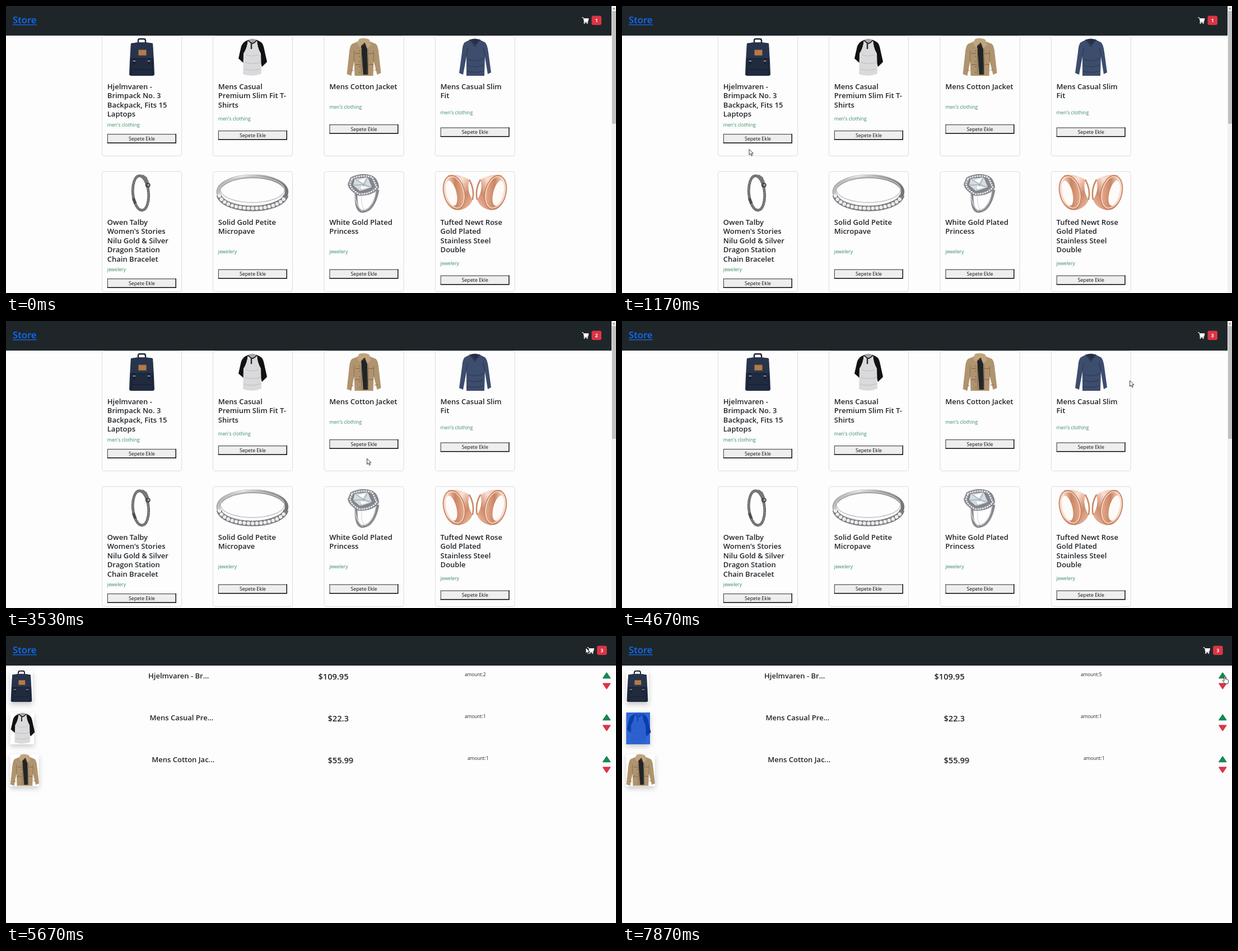
Recreate the animation shown at these times as an HTML page. Size 1089 by 514 pixels, loop 8 s.

```html
<!DOCTYPE html>
<html lang="en">
<head>
<meta charset="utf-8">
<title>Store</title>
<style>
html, body { margin: 0; width: 100%; height: 100%; overflow: hidden; background: #fdfdfd; }
svg { display: block; }
#stage { width: 100%; height: 100%; }
text { font-family: "Open Sans", "Noto Sans", sans-serif; fill: #212529; white-space: pre; }
.brand { font-size: 16.7px; font-weight: 600; fill: #0d6efd; }
.title { font-size: 13px; font-weight: 600; }
.kind { font-size: 8.6px; fill: #3b8a66; }
.label { font-size: 8.8px; fill: #111; text-anchor: middle; }
.price { font-size: 14.6px; font-weight: 600; }
.amount { font-size: 8.3px; }
.badge { font-size: 8.4px; font-weight: 700; fill: #fff; text-anchor: middle; }
.card { fill: #fdfdfd; stroke: #dcdcde; }
.photo { filter: drop-shadow(0 4px 5px rgba(0, 0, 0, .2)); }
</style>
</head>
<body>
<svg id="stage" viewBox="0 0 1089 514" preserveAspectRatio="none">
  <defs>
    <linearGradient id="silver" x2="1" y2=".4">
      <stop offset="0" stop-color="#8c8c8e"/><stop offset=".3" stop-color="#e9e9ea"/>
      <stop offset=".6" stop-color="#a5a5a8"/><stop offset="1" stop-color="#747477"/>
    </linearGradient>
    <linearGradient id="rose" x2="1" y2="1">
      <stop offset="0" stop-color="#e9b49b"/><stop offset=".35" stop-color="#fae0d3"/>
      <stop offset=".65" stop-color="#d08b6a"/><stop offset="1" stop-color="#f0c5b0"/>
    </linearGradient>
    <linearGradient id="roseIn" x2="1" y2=".4">
      <stop offset=".3" stop-color="#f6d8c9"/><stop offset=".65" stop-color="#c98562"/><stop offset="1" stop-color="#e3a88c"/>
    </linearGradient>

    <g id="backpack">
      <path d="M17 10V4q0-3 3-3h7q3 0 3 3v6" fill="none" stroke="#1a2130" stroke-width="2.4"/>
      <path d="M4 9q20-4 39 0l2 31 1 24q0 3-4 3H5q-4 0-4-3l1-24z" fill="#212b40"/>
      <path d="M4 9q20-4 39 0l1 27H3z" fill="#28344c"/>
      <path d="M3 36h41M5 42v23M42 42v23M6 56h35" stroke="#151c2b" fill="none"/>
      <path d="M10 36v11M36 36v11" stroke="#10172a" stroke-width="2"/>
      <path d="M8 40.5h4M34 40.5h4" stroke="#c3c6cb" stroke-width="1.5"/>
      <rect x="17.5" y="20.5" width="14" height="10" fill="#b57a45"/>
    </g>
    <g id="shirt">
      <path d="M18 3Q9 6 6 14L1 36l9 8 6-18zM34 3q10 3 12 12l6 27-9 9-8-25z" fill="#121214"/>
      <path d="M18 3l8 5 8-5q1 14 7 24l1 36q-16 7-33 1l1-37q6-9 8-24z" fill="#dadadc"/>
      <path d="M14 29q10 5 23 0M12 43q14 4 28 0M12 55q12 5 29-1" fill="none" stroke="#bdbdc1"/>
      <path d="M18 3q8-5 16 0l-6 5h-4z" fill="#a6a6aa"/>
      <path d="M18 3q5 6 8 6t8-6" fill="none" stroke="#19191b" stroke-width="1.8"/>
      <path d="M24 8v11" stroke="#2a2a2c" stroke-width="2.4"/>
    </g>
    <g id="jacket">
      <path d="M21 5L9 10Q5 14 4 27L0 64l8 3 5-26 1 26h33l1-26 6 24 7-3-4-35q-1-13-5-17L40 5z" fill="#b0946f"/>
      <path d="M25 7l11 1 2 57h-9z" fill="#35322f"/>
      <path d="M26 14l6-2 4 7-1 45h-4z" fill="#1f2426"/>
      <path d="M22 1q9-3 18 1l3 11-7 5-4-11-9 9-5-7z" fill="#bfa47d"/>
      <path d="M13 22v20M48 22v20M26 17v48M38 19v46M7 57l5 1M49 57l6-1" fill="none" stroke="#866e50"/>
      <path d="M15 27h9M39 27h9M15 47h10M39 47h8" stroke="#8a7151" stroke-width="1.7"/>
      <path d="M23 22v42" stroke="#665239" stroke-width="1.4" stroke-dasharray="1.5 8"/>
    </g>
    <g id="sweater">
      <path d="M20 2L10 7Q6 10 5 25L0 62l7 3 6-32v34h32l1-34 5 31 6-3-5-37Q50 10 46 7L36 2z" fill="#3d4d6d"/>
      <path d="M20 2q8-3 16 0l-7 10z" fill="#252f45"/>
      <path d="M19 2l9 12 9-12" fill="none" stroke="#2d3a54" stroke-width="2"/>
      <path d="M13 31l2-14M46 31l-3-14M15 37q14 7 29-2M14 48q17 6 30-1M14 59q16 4 29-1" fill="none" stroke="#2d3a56" stroke-width="1.3"/>
    </g>
    <g id="bracelet" fill="none" transform="rotate(-5 18 34)">
      <ellipse cx="18" cy="34" rx="14" ry="31" stroke="#58585c" stroke-width="4.6"/>
      <ellipse cx="18" cy="34" rx="14" ry="31" stroke="#b0b0b4" stroke-width="2.6" stroke-dasharray="1.2 1.6"/>
      <path d="M23 3l6 5 3 9" stroke="#77777b" stroke-width="5"/>
      <circle cx="32" cy="21" r="3.4" stroke="#38383c" stroke-width="2"/>
      <path d="M4 42l3 10" stroke="#4e4e52" stroke-width="5"/>
    </g>
    <g id="band" fill="none">
      <ellipse cx="64" cy="32" rx="61" ry="28" stroke="#88888b" stroke-width="6.5"/>
      <ellipse cx="64" cy="31.5" rx="61" ry="28" stroke="url(#silver)" stroke-width="5"/>
      <ellipse cx="64" cy="28" rx="57" ry="23" stroke="#c2c2c5" stroke-width="1.5"/>
      <path d="M4 38C14 70 114 70 124 38" stroke="#7c7c80" stroke-width="9"/>
      <path d="M5 39C15 69 113 69 123 39" stroke="#ececef" stroke-width="6.4" stroke-linecap="round" stroke-dasharray="0 7.4"/>
    </g>
    <g id="princess" fill="none">
      <path d="M16 35Q15 67 28 67Q48 65 55 28" stroke="#88888d" stroke-width="5"/>
      <path d="M13 36Q17 60 28 66M26 38Q24 60 33 65M50 20Q53 50 34 64" stroke="#dedee2" stroke-width="2.2" stroke-dasharray="2 1"/>
      <path d="M6 6Q27-4 45 3Q56 9 57 24Q48 39 21 39Q3 30 1 18Z" fill="#85858d"/>
      <path d="M9 8Q28 0 45 6L53 24Q42 36 22 36Q6 28 5 17Z" stroke="#e6e6ea" stroke-width="3.4" stroke-linecap="round" stroke-dasharray="0 4.3"/>
      <path d="M13 8L37 5L45 24L23 31L10 20Z" fill="#d5dce0" stroke="#73777d"/>
      <path d="M13 8l17 11 7-14M10 20l20-1 15 5M30 19l-7 12" stroke="#8c9aa3"/>
      <path d="M20 11l8 5 5-8zM25 21l12 3-12 3z" fill="#fff"/>
    </g>
    <g id="flare">
      <path d="M12 2Q34-1 50 10Q45 30 56 46Q50 62 30 65Z" fill="url(#rose)"/>
      <path d="M50 10Q60 27 56 46" fill="none" stroke="#c98562" stroke-width="2.5"/>
      <g transform="rotate(-14 23 33)">
        <ellipse cx="23" cy="33" rx="18.5" ry="31" fill="url(#roseIn)" stroke="#c27b58" stroke-width="1.6"/>
        <ellipse cx="24" cy="33" rx="16" ry="28.5" fill="none" stroke="#f8ded1" stroke-width="1.5"/>
        <ellipse cx="18" cy="33" rx="9" ry="23" fill="#fdfaf8"/>
      </g>
    </g>
    <g id="cart" fill="#fff">
      <path d="M0 .7h2.4l.6 2H12l-1.4 5.4H4.1L4.3 9h6.4" fill="none" stroke="#fff" stroke-width="1"/>
      <path d="M2.7 2.3H12l-1.5 5.6H3.8z"/>
      <circle cx="4.6" cy="10.5" r="1.2"/><circle cx="9.6" cy="10.5" r="1.2"/>
    </g>
  </defs>

  <g id="shop"></g>
  <g id="basket"></g>

  <rect width="1089" height="53" fill="#1f262a"/>
  <text class="brand" x="12" y="31">Store</text>
  <path d="M12 33.6h43" stroke="#0d6efd" stroke-width="1.4"/>
  <g id="tools">
    <use href="#cart" x="1028" y="20"/>
    <rect x="1045.5" y="17.5" width="17.5" height="16.5" rx="3.2" fill="#dc3545"/>
    <text class="badge" id="count" x="1054.2" y="28.8">1</text>
  </g>

  <g id="scrollbar">
    <rect x="1081" width="8" height="514" fill="#f1f1f1"/>
    <path d="M1082.8 6l2.4-3 2.4 3z" fill="#8a8a8a"/>
    <rect id="thumb" x="1082" y="9" width="7" height="202"/>
  </g>

  <g id="cursor" stroke="#222" stroke-width=".9" fill="#fff" stroke-linejoin="round">
    <path id="arrow" d="M0 0v10.2l2.4-2.2 1.7 3.8 1.7-.8-1.7-3.6h3.3z"/>
    <path id="hand" d="M-1 1q0-1.5 1.1-1.5T1.2 1v4l1.6.3 1.7.4 1.3.6q.9.4.9 1.6V10q0 1.2-.9 2.5v1H-.4v-1L-3.4 8.6q-.7-1.1.2-1.6.8-.3 1.4.5l.8.9z"/>
  </g>
</svg>

<script>
const el = id => document.getElementById(id);
const LOOP = 8000, PAGE_AT = 5630;

const columns = [171.5, 369.5, 568, 766.3];
// picture, picture x, title lines, category baseline, button top
const products = [
  ["backpack", 219, ["Hjelmvaren -", "Brimpack No. 3", "Backpack, Fits 15", "Laptops"], 216, 229],
  ["shirt", 414, ["Mens Casual", "Premium Slim Fit T-", "Shirts"], 205, 223],
  ["jacket", 608.5, ["Mens Cotton Jacket"], 183.5, 212],
  ["sweater", 809, ["Mens Casual Slim", "Fit"], 194, 217.5],
  ["bracelet", 222.5, ["Owen Talby", "Women's Stories", "Nilu Gold & Silver", "Dragon Station", "Chain Bracelet"], 475.3, 488],
  ["band", 376, ["Solid Gold Petite", "Micropave"], 442.5, 471.5],
  ["princess", 609, ["White Gold Plated", "Princess"], 442.5, 471.5],
  ["flare", 777, ["Tufted Newt Rose", "Gold Plated", "Stainless Steel", "Double"], 464, 482.5]
];

const esc = s => s.replace(/&/g, "&amp;");
const text = (cls, x, y, s) => `<text class="${cls}" x="${x}" y="${y}">${esc(s)}</text>`;

function card([pic, px, lines, kindY, top], i) {
  const x = columns[i % 4], row = i < 4 ? 0 : 1, y = 53.5 + row * 243;
  const left = x + 9.3, right = x + 132.3;
  const picY = y + 4.5;
  return `<rect class="card" x="${x}" y="${y}" width="142" height="215" rx="3.5"/>
    <use href="#${pic}" x="${px}" y="${picY}"/>
    ${pic === "flare" ? `<use href="#flare" x="${-px - 120}" y="${picY}" transform="scale(-1 1)"/>` : ""}
    ${lines.map((s, n) => text("title", left, y + 95.3 + n * 16.5, s)).join("")}
    ${text("kind", left, kindY, row ? "jewelery" : "men's clothing")}
    <rect class="button" x="${left}" y="${top}" width="123" height="16.8"/>
    <path d="M${left + .6} ${top + 16}V${top + .6}H${right}" fill="none" stroke="#555" stroke-width="1.2"/>
    <path d="M${left} ${top + 16.2}H${right - .6}V${top}" fill="none" stroke="#050505" stroke-width="1.4"/>
    ${text("label", left + 61.7, top + 11.5, "Sepete Ekle")}`;
}
el("shop").innerHTML = products.map(card).join("");

// picture, width, name x, name, price x, price, amount x
const items = [
  ["backpack", 40, 254, "Hjelmvaren - Br...", 557.5, "$109.95", 819],
  ["shirt", 42.5, 256.5, "Mens Casual Pre...", 574.5, "$22.3", 819],
  ["jacket", 51.3, 260.3, "Mens Cotton Jac...", 574.5, "$55.99", 824]
];

function line([pic, w, nx, name, px, price, ax], i) {
  const triangle = (d, color) =>
    `<path d="${d}" fill="${color}" stroke="${color}" stroke-width="1.6" stroke-linejoin="round"/>`;
  return `<g transform="translate(0 ${i * 75})">
    <rect class="photo" x="7.5" y="62" width="${w}" height="57" fill="#fff"/>
    <use href="#${pic}" transform="translate(7.8 62) scale(.838)"/>
    ${i === 1 ? `<rect id="selection" x="7.5" y="62" width="${w}" height="57" fill="#0848cc" opacity=".83"/>` : ""}
    ${text("title", nx, 75.7, name)}${text("price", px, 77.6, price)}${text("amount", ax, 72, "amount:1")}
    ${triangle("M1072.3 66l6.4 9.4h-12.8z", "#198754")}
    ${triangle("M1072.3 94.5l6.4-9.4h-12.8z", "#dc3545")}
  </g>`;
}
el("basket").innerHTML = items.map(line).join("");

const buttons = [...document.querySelectorAll(".button")];
const boxes = products.map((p, i) => [columns[i % 4] + 9.3, p[4], 123, 17]);
const firstAmount = document.querySelector(".amount");

// pointer stops: time, x, y
const path = [
  [770, 399, 24], [970, 221, 261], [1140, 221, 261], [1170, 227, 256.5], [1730, 236, 236],
  [1880, 236, 236], [2030, 251, 235], [2540, 251, 235], [2570, 266, 233.5], [3030, 430, 231],
  [3170, 430, 231], [3530, 644.5, 246.5], [3930, 651, 224], [4040, 651, 224], [4070, 653, 222],
  [4470, 653, 222], [4830, 1085, 26], [4940, 1085, 26], [5230, 1035, 21],
  [5740, 1035, 21], [6370, 1069, 78.5], [6390, 1069, 78.5], [6470, 1075.5, 77],
  [6620, 1075.5, 77], [6670, 1076, 72], [LOOP, 1076, 72]
];

function pointer(t) {
  const n = path.findIndex(p => p[0] > t);
  const [t0, x0, y0] = path[n - 1], [t1, x1, y1] = path[n];
  const k = (t - t0) / (t1 - t0), e = k * k * (3 - 2 * k);
  return [x0 + (x1 - x0) * e, y0 + (y1 - y0) * e];
}

const inside = (px, py, [x, y, w, h]) => px >= x && px <= x + w && py >= y && py <= y + h;
const show = (id, on) => el(id).setAttribute("display", on ? "inline" : "none");
const steps = (t, start, times) => start + times.filter(at => t >= at).length;

function draw(t) {
  const shopping = t < PAGE_AT, visible = t >= 770;
  const [x, y] = visible ? pointer(t) : [-50, -50];
  const shift = shopping ? 0 : 9.6;
  show("shop", shopping);
  show("scrollbar", shopping);
  show("basket", !shopping);
  el("tools").setAttribute("transform", `translate(${shift} 0)`);
  el("count").textContent = steps(t, 1, [3170, 4470]);
  firstAmount.textContent = "amount:" + steps(t, 2, [7230, 7500, 7770]);
  show("selection", t >= 7670);

  const hot = boxes.map(b => shopping && inside(x, y, b));
  const pressed = t >= 4270 && t < 4300;
  buttons.forEach((b, i) => b.setAttribute("fill", hot[i] ? (pressed ? "#f5f5f5" : "#ebebeb") : "#eee"));
  el("thumb").setAttribute("fill", x > 1081 && y < 211 ? "#a8a8a8" : "#c1c1c1");

  const link = inside(x, y, [1026 + shift, 14, 38, 22]) || (!shopping && inside(x, y, [1064, 63, 18, 34]));
  const hand = link || hot.includes(true);
  show("cursor", visible);
  show("hand", hand);
  show("arrow", !hand);
  el("cursor").setAttribute("transform", `translate(${x} ${y})`);
}

const start = performance.now();
function tick() {
  draw((performance.now() - start) % LOOP);
  requestAnimationFrame(tick);
}
tick();
</script>
</body>
</html>
```
